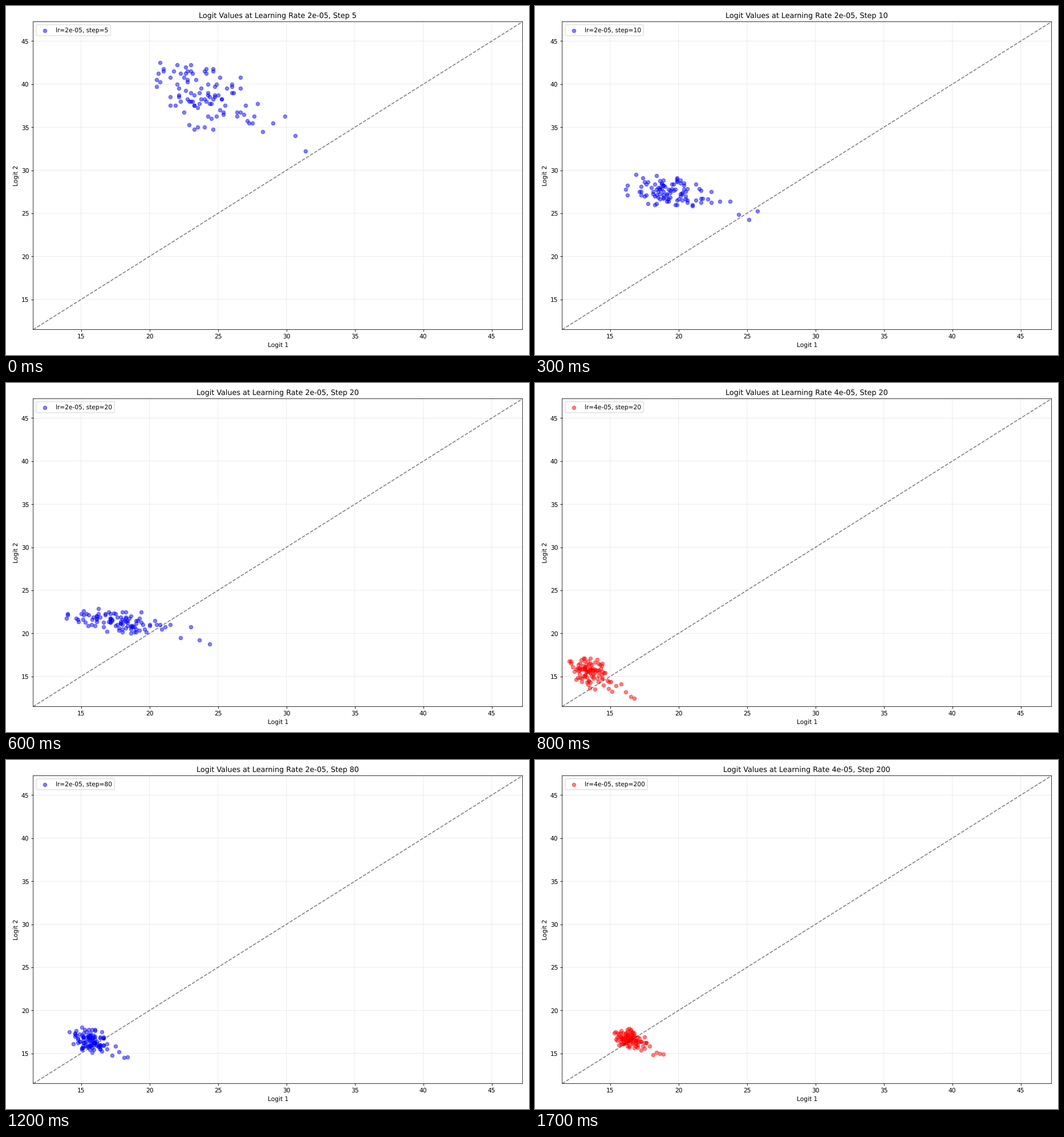
Recreate the animation shown at these times as a matplotlib script. Size 917 px wide and 611 px high, loop 1800 ms.

```python
import numpy as np
import matplotlib.pyplot as plt
from matplotlib.animation import FuncAnimation

W, H, DPI = 917, 611, 76.375
LEFT, RIGHT, TOP, BOTTOM = 47.7, 905.7, 27.5, 566.5
LOW, HIGH = 11.5, 47.25
POINTS, TAIL = 100, 7

STEPS = [5, 10, 20, 40, 80, 200]
RATES = [(2, "blue"), (3, "green"), (4, "red")]
FRAMES = len(STEPS) * len(RATES)

# Cloud shape along the training amount (rate times step)
AMOUNT = [10, 20, 40, 80, 120, 320, 800]
MEAN_X = [23.8, 19.2, 17.4, 13.6, 15.4, 15.8, 16.5]
MEAN_Y = [39.0, 27.6, 21.5, 15.3, 17.0, 15.65, 16.6]
SPREAD_X = [1.9, 1.65, 1.75, 0.8, 0.8, 0.52, 0.6]
SPREAD_Y = [2.4, 1.0, 0.8, 1.0, 0.85, 0.62, 0.65]
CORRELATION = -0.35


def setting(i):
    step = STEPS[i // len(RATES)]
    rate, color = RATES[i % len(RATES)]
    return step, rate, color


def quantize(v):
    """Round to the coarse grid of an 8-bit mantissa."""
    grid = 2.0 ** (np.floor(np.log2(v)) - 7)
    return np.round(v / grid) * grid


def unit_cloud(rng):
    """Bounded normal cloud with a thin tail to the lower right."""
    n = POINTS - TAIL
    u = (np.arange(n) + 0.5) / n
    r = np.sqrt(-2 * np.log(1 - 0.9 * u))
    a = rng.uniform(0, 2 * np.pi, n)
    x = r * np.cos(a)
    y = CORRELATION * x + np.sqrt(1 - CORRELATION ** 2) * r * np.sin(a)
    reach = np.linspace(1.5, 4, TAIL)
    tail_y = -0.6 * reach + rng.normal(0, 0.7, TAIL)
    return np.append(x, reach), np.append(y, tail_y)


def cloud(i):
    step, rate, _ = setting(i)
    mx, my, sx, sy = (np.interp(np.log(step * rate), np.log(AMOUNT), keys)
                      for keys in (MEAN_X, MEAN_Y, SPREAD_X, SPREAD_Y))
    x, y = unit_cloud(np.random.default_rng(i))
    return quantize(np.column_stack([mx + sx * x, my + sy * y]))


data = [cloud(i) for i in range(FRAMES)]

# Thin unsnapped lines and unhinted text give soft, evenly scaled edges
plt.rcParams.update({
    "font.family": "DejaVu Sans",
    "path.snap": False,
    "text.hinting": "none",
    "axes.linewidth": 0.75,
    "grid.linewidth": 0.75,
})
# The tiny margin keeps the pixel size from rounding down
fig = plt.figure(figsize=(W / DPI + 1e-6, H / DPI + 1e-6), dpi=DPI)
ax = fig.add_axes([LEFT / W, 1 - BOTTOM / H, (RIGHT - LEFT) / W, (BOTTOM - TOP) / H])
dots = ax.scatter([], [], alpha=0.5)
ax.plot([LOW, HIGH], [LOW, HIGH], "k--", alpha=0.5)
ax.set_xlim(LOW, HIGH)
ax.set_ylim(LOW, HIGH)
ax.set_xlabel("Logit 1")
ax.set_ylabel("Logit 2")
ax.grid(True, alpha=0.3)


def draw(i):
    step, rate, color = setting(i)
    dots.set_offsets(data[i])
    dots.set_color(color)
    dots.set_label(f"lr={rate}e-05, step={step}")
    ax.set_title(f"Logit Values at Learning Rate {rate}e-05, Step {step}")
    ax.legend(loc="upper left")
    return [dots]


anim = FuncAnimation(fig, draw, frames=FRAMES, interval=100, init_func=lambda: draw(0),
                     repeat=True, repeat_delay=0, blit=False)
plt.show()
```
